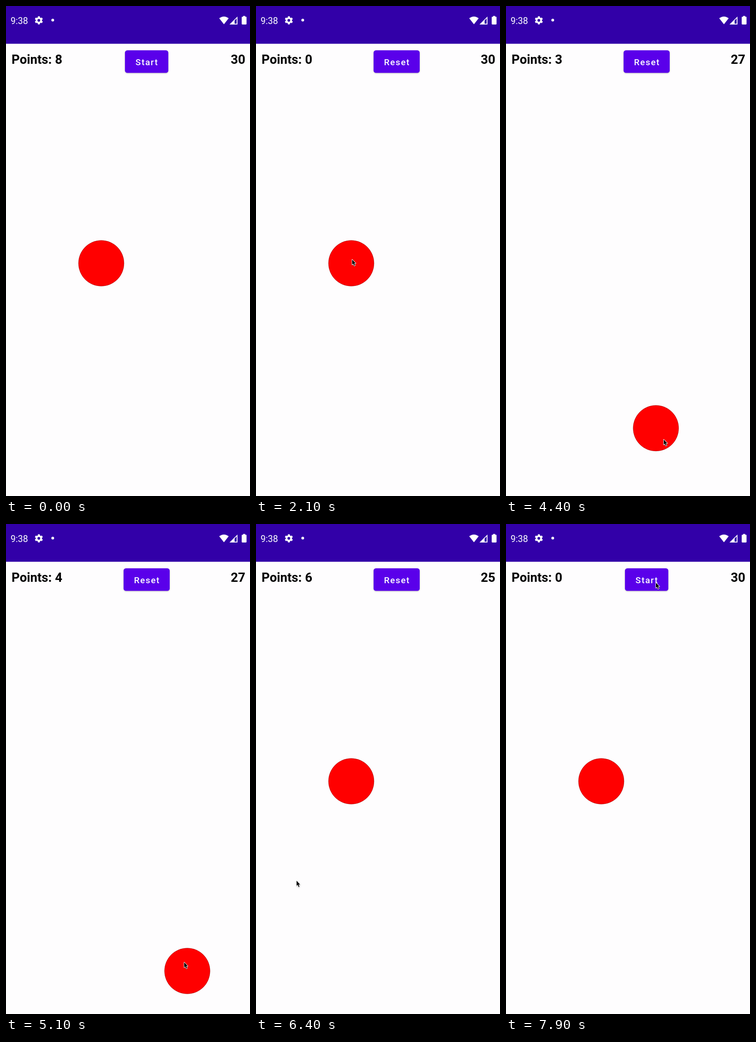
These frames come from a looping animation (529 px wide and 1059 px high, 8 s). An HTML page with a canvas:

```html
<!DOCTYPE html>
<html lang="en">
<head>
<meta charset="utf-8">
<title>Tap the ball</title>
<style>
  html, body { margin: 0; width: 100%; height: 100%; overflow: hidden; background: #fefdfe; }
  canvas { display: block; width: 529px; height: 1059px; }
</style>
</head>
<body>
<canvas id="stage" width="529" height="1059"></canvas>
<script>
const ctx = document.getElementById('stage').getContext('2d');
const LOOP = 8000, STEP = 100;
const TIMER_START = 1260, SECOND = 1020;
const REST = 200, RIPPLE = 300;
const HEADER = '#3200a8', PAPER = '#fefdfe';
const HOME = { x: 206.5, y: 556 };

const move = (at, x, y) => ({ at, x, y });
const press = (at, x, y) => ({ at, x, y, button: true });
const hit = (at, x, y, ballX, ballY) => ({ at, x, y, ball: { x: ballX, y: ballY } });

// The pointer's journey: passing points, button presses, and hits that send the ball elsewhere.
const journey = [
  move(100, 211, 364),
  move(200, 150, 321),
  move(600, 150, 321),
  move(850, 25, 110),
  move(1050, 488, 31),
  press(1400, 320, 130),
  hit(2300, 208.5, 548, 134, 722),
  hit(2900, 137, 722, 146.8, 523),
  move(3200, 197.5, 585),
  hit(3500, 167, 541, 325, 912.5),
  hit(4600, 342, 937, 393, 966),
  hit(5400, 393.5, 949, 77.6, 771),
  hit(6400, 88, 771, HOME.x, HOME.y),
  move(7200, 318.5, 137),
  press(7600, 318.5, 137),
  move(7900, 325, 127)
];

const easeOut = u => u * (1.2 - 0.2 * u);

function gameAt(t) {
  const game = { points: 8, ball: HOME, running: false, seconds: 30 };
  for (const { at, ball, button } of journey) {
    if (at > t) break;
    if (ball) {
      game.points++;
      game.ball = ball;
    } else if (button) {
      game.points = 0;
      game.ball = HOME;
      game.running = !game.running;
    }
  }
  if (game.running) game.seconds -= Math.floor((t - TIMER_START) / SECOND);
  return game;
}

// The pointer arrives a little early and rests before each tap.
function pointerAt(t) {
  const i = journey.findIndex(stop => stop.at > t);
  if (i === 0) return null;
  if (i < 0) return journey.at(-1);
  const from = journey[i - 1], to = journey[i];
  const arrive = to.at - (to.ball || to.button ? REST : 0);
  const k = easeOut(Math.min(1, (t - from.at) / (arrive - from.at)));
  return { x: from.x + (to.x - from.x) * k, y: from.y + (to.y - from.y) * k };
}

function text(str, x, y, size, weight, color, align = 'left', spacing = 0) {
  ctx.font = `${weight} ${size}px Roboto, sans-serif`;
  ctx.letterSpacing = spacing + 'px';
  ctx.textAlign = align;
  ctx.fillStyle = color;
  ctx.fillText(str, x, y);
}

function polygon(...points) {
  ctx.beginPath();
  points.forEach(([x, y]) => ctx.lineTo(x, y));
  ctx.closePath();
}

function disc(x, y, r, color) {
  ctx.beginPath();
  ctx.arc(x, y, r, 0, Math.PI * 2);
  ctx.fillStyle = color;
  ctx.fill();
}

function gear(x, y) {
  ctx.save();
  ctx.translate(x, y);
  disc(0, 0, 6.6, '#fff');
  for (let i = 0; i < 6; i++) {
    polygon([-2.7, -5.4], [-1.9, -8.8], [1.9, -8.8], [2.7, -5.4]);
    ctx.fill();
    ctx.rotate(Math.PI / 3);
  }
  disc(0, 0, 3, HEADER);
  ctx.restore();
}

function statusBar() {
  ctx.fillStyle = HEADER;
  ctx.fillRect(0, 0, 529, 81.6);
  text('9:38', 10, 38.5, 19.5, 400, '#fff');
  gear(71.2, 31);
  disc(101.3, 30.6, 3, '#fff');

  ctx.beginPath();
  ctx.moveTo(472.5, 39.5);
  ctx.lineTo(462.2, 26.6);
  ctx.quadraticCurveTo(472.5, 18.8, 482.8, 26.6);
  ctx.fill();

  polygon([484.5, 40], [501.8, 22.7], [501.8, 40]);
  ctx.fill();
  ctx.fillStyle = HEADER;
  polygon([495.6, 31.3], [500, 27], [500, 38.2], [495.6, 38.2]);
  ctx.fill();

  ctx.fillStyle = '#fff';
  ctx.fillRect(514, 21.5, 4.6, 3);
  ctx.beginPath();
  ctx.roundRect(511, 23.2, 10.5, 16.8, 1.4);
  ctx.fill();
}

function ripple({ at, x, y }, t) {
  const age = (t - at) / RIPPLE;
  if (age < 0 || age >= 1) return;
  ctx.save();
  ctx.clip();
  disc(x, y, 45 + 90 * age, `rgba(255,255,255,${0.22 * (1 - age)})`);
  ctx.restore();
}

function button(running, t) {
  const width = running ? 100 : 94, center = 304.9;
  ctx.save();
  ctx.shadowColor = 'rgba(0,0,0,.25)';
  ctx.shadowBlur = 3;
  ctx.shadowOffsetY = 1;
  ctx.fillStyle = '#5a00ea';
  ctx.beginPath();
  ctx.roundRect(center - width / 2, 95.8, width, 48.8, 5.2);
  ctx.fill();
  ctx.restore();
  journey.filter(stop => stop.button).forEach(stop => ripple(stop, t));
  text(running ? 'Reset' : 'Start', center + 0.8, 127.8, 18.9, 500, '#fff', 'center', 1.68);
}

function ball({ x, y }) {
  disc(x, y, 49.4, '#f00');
  ctx.lineWidth = 0.6;
  ctx.strokeStyle = 'rgba(70,0,0,.6)';
  ctx.stroke();
}

function pointer({ x, y }) {
  ctx.save();
  ctx.translate(x, y);
  ctx.scale(0.88, 0.88);
  polygon([0, 0], [0, 12.6], [2.8, 10], [5, 15.2], [7.1, 14.3], [4.9, 9.3], [8.8, 9.3]);
  ctx.lineJoin = 'round';
  ctx.lineWidth = 2;
  ctx.strokeStyle = '#fff';
  ctx.shadowColor = 'rgba(0,0,0,.25)';
  ctx.shadowBlur = 2;
  ctx.shadowOffsetY = 1;
  ctx.stroke();
  ctx.shadowColor = 'transparent';
  ctx.fillStyle = '#000';
  ctx.fill();
  ctx.restore();
}

function draw(t) {
  const game = gameAt(t), tip = pointerAt(t);
  ctx.fillStyle = PAPER;
  ctx.fillRect(0, 0, 529, 1059);
  statusBar();
  text('Points: ' + game.points, 12, 125, 27.6, 700, '#000');
  text(game.seconds, 518.8, 125, 27.6, 700, '#000', 'right');
  button(game.running, t);
  ball(game.ball);
  if (tip) pointer(tip);
}

const began = performance.now();
function frame() {
  const t = (performance.now() - began) % LOOP;
  draw(Math.floor(t / STEP) * STEP);
  requestAnimationFrame(frame);
}
frame();
</script>
</body>
</html>
```
